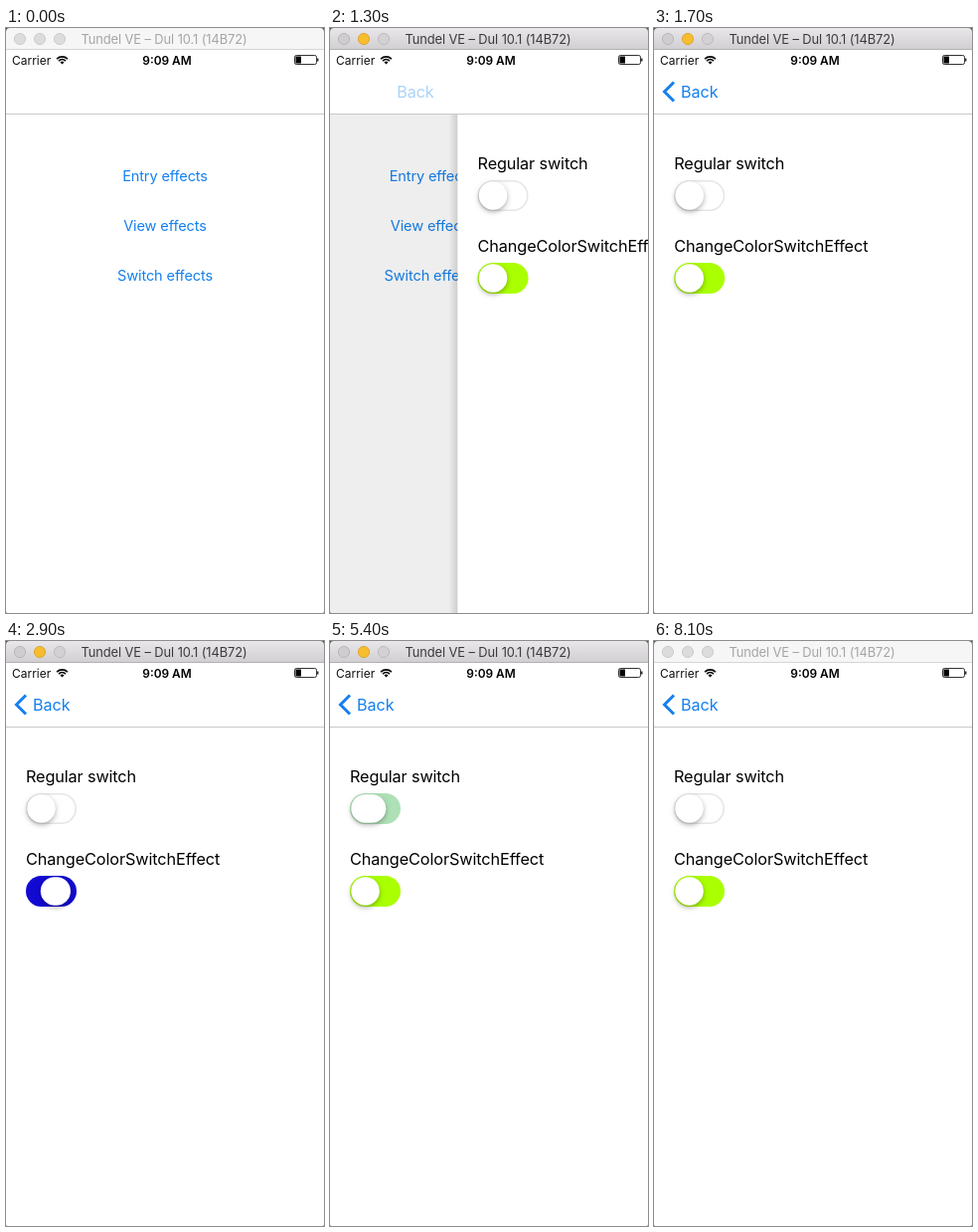
An HTML page with a canvas for the animation above (8.2 s loop, 320 by 588 pixels).

```html
<!DOCTYPE html>
<html lang="en">
<head>
<meta charset="utf-8">
<title>Switch effects</title>
<style>
html, body { margin: 0; width: 100%; height: 100%; overflow: hidden; background: #fff; }
canvas { display: block; width: 320px; height: 588px; }
</style>
</head>
<body>
<canvas id="stage"></canvas>
<script>
const W = 320, H = 588, LOOP = 8200, TICK = 100;
const BLUE = '#1480f0', GREY = [229, 229, 229], GREEN = [76, 217, 100];
const LIME = [170, 255, 0], INDIGO = [18, 9, 210];
const canvas = document.getElementById('stage');
const ctx = canvas.getContext('2d');
const dpr = window.devicePixelRatio || 1;
canvas.width = W * dpr;
canvas.height = H * dpr;

const clamp = v => Math.max(0, Math.min(1, v));
const ramp = (t, from, to) => clamp((t - from) / (to - from));
const ease = v => v * v * (3 - 2 * v);
const lerp = (a, b, k) => a + (b - a) * k;
const mix = (a, b, k) => `rgb(${a.map((v, i) => Math.round(lerp(v, b[i], k)))})`;

function text(str, x, y, size, color, opt = {}) {
  ctx.font = `${opt.weight || 400} ${size}px Inter, Roboto, sans-serif`;
  ctx.letterSpacing = (opt.spacing || 0) + 'px';
  ctx.textAlign = opt.align || 'left';
  ctx.fillStyle = color;
  ctx.fillText(str, x, y);
}

function pill(x, y, w, h, color) {
  ctx.fillStyle = color;
  ctx.beginPath();
  ctx.roundRect(x, y, w, h, Math.min(w, h) / 2);
  ctx.fill();
}

function withAlpha(alpha, draw) {
  ctx.save();
  ctx.globalAlpha = alpha;
  draw();
  ctx.restore();
}

function titleBar(active) {
  const g = ctx.createLinearGradient(0, 0, 0, 21);
  g.addColorStop(0, active ? '#e9e7e9' : '#f6f6f6');
  g.addColorStop(1, active ? '#d1cfd1' : '#f6f6f6');
  ctx.fillStyle = g;
  ctx.fillRect(0, 0, W, 22);
  ctx.fillStyle = active ? '#b3b1b3' : '#d6d6d6';
  ctx.fillRect(0, 21, W, 1);
  const fills = active ? ['#cfcdcf', '#f8bd2f', '#d3d1d3'] : ['#dcdcdc', '#dcdcdc', '#dcdcdc'];
  const rims = active ? ['#b5b3b5', '#dca32c', '#bab8ba'] : ['#c9c9c9', '#c9c9c9', '#c9c9c9'];
  fills.forEach((fill, i) => {
    ctx.beginPath();
    ctx.arc(14 + 20 * i, 11, 5.6, 0, 7);
    ctx.fillStyle = fill;
    ctx.fill();
    ctx.lineWidth = 0.9;
    ctx.strokeStyle = rims[i];
    ctx.stroke();
  });
  text('Tundel VE – Dul 10.1 (14B72)', 159, 16, 12.9, active ? '#3c3b3c' : '#a5a5a5',
    { align: 'center', spacing: -0.1 });
}

function statusBar() {
  text('Carrier', 6, 36.6, 12, '#111');
  text('9:09 AM', 162, 36.6, 11.9, '#000', { align: 'center', weight: 600 });
  ctx.strokeStyle = ctx.fillStyle = '#000';
  ctx.lineWidth = 1.7;
  for (const r of [7.6, 4.8]) {
    ctx.beginPath();
    ctx.arc(56.5, 36.5, r, -Math.PI * 0.75, -Math.PI * 0.25);
    ctx.stroke();
  }
  ctx.beginPath();
  ctx.moveTo(56.5, 36.5);
  ctx.arc(56.5, 36.5, 2.8, -Math.PI * 0.75, -Math.PI * 0.25);
  ctx.fill();
  ctx.lineWidth = 1;
  ctx.strokeStyle = '#333';
  ctx.beginPath();
  ctx.roundRect(290.5, 27.5, 22, 9, 1.8);
  ctx.stroke();
  ctx.fillRect(291.5, 28.5, 5.5, 7);
  ctx.fillRect(313.2, 30.5, 1.2, 3);
}

function navBar(p) {
  ctx.fillStyle = '#fff';
  ctx.fillRect(0, 22, W, 64);
  ctx.fillStyle = '#c9c9c9';
  ctx.fillRect(0, 86, W, 1);
  statusBar();
  if (p <= 0) return;
  withAlpha(clamp((p - 0.87) / 0.13), () => {
    ctx.strokeStyle = BLUE;
    ctx.lineWidth = 3;
    ctx.beginPath();
    ctx.moveTo(20, 54.5);
    ctx.lineTo(10.5, 64);
    ctx.lineTo(20, 73.5);
    ctx.stroke();
  });
  withAlpha(p * p, () => text('Back', lerp(127, 27, p), 70, 16.2, BLUE, { spacing: -0.1 }));
}

function homePage(x, pressed) {
  ['Entry effects', 'View effects', 'Switch effects'].forEach((label, i) => {
    withAlpha(pressed && i === 2 ? 0.2 : 1, () =>
      text(label, x + 160, 153.6 + 50 * i, 14.6, BLUE, { align: 'center', spacing: -0.15 }));
  });
}

// s: on = thumb travel, tint = colour blend, hole = size of the white inset, stretch = extra thumb width
function toggle(x, y, off, on, s) {
  pill(x, y, 51, 31, mix(off, on, s.tint));
  if (s.hole > 0) {
    const w = 48 * s.hole, h = 28 * s.hole;
    pill(x + 25.5 - w / 2, y + 15.5 - h / 2, w, h, '#fff');
  }
  const w = 28.5 + s.stretch;
  const left = x + 1.3 + (51 - 2.6 - w) * s.on;
  ctx.save();
  ctx.shadowColor = 'rgba(0,0,0,.32)';
  ctx.shadowBlur = 5 * dpr;
  ctx.shadowOffsetY = 2 * dpr;
  pill(left, y + 1.2, w, 28.5, '#fff');
  ctx.restore();
}

// Press, release and settle for a switch turned on and later off again
function toggleState(t, onAt, offAt, hollow) {
  const slide = at => ease(ramp(t, at, at + 300));
  const press = at => ease(ramp(t, at - 200, at - 50)) * (1 - slide(at));
  const tint = ramp(t, onAt - 50, onAt + 90) - ramp(t, offAt, offAt + 280);
  const shrink = ramp(t, onAt - 200, onAt);
  const grow = 1 - Math.pow(1 - ramp(t, offAt, offAt + 600), 3);
  return {
    on: slide(onAt) - slide(offAt),
    tint,
    hole: hollow ? (t < offAt ? 1 - shrink : grow) : 0,
    stretch: 6.5 * (press(onAt) + press(offAt))
  };
}

function switchPage(x, t) {
  ctx.fillStyle = '#fff';
  ctx.fillRect(x, 87, W, H - 87);
  text('Regular switch', x + 20, 142, 16.3, '#000', { spacing: -0.15 });
  text('ChangeColorSwitchEffect', x + 20, 225.4, 16.3, '#000', { spacing: -0.12 });
  toggle(x + 20, 153, GREY, GREEN, toggleState(t, 5400, 6000, true));
  toggle(x + 20, 236, LIME, INDIGO, toggleState(t, 2700, 3850, false));
}

// Critically damped spring, 0 to 1
function push(t) {
  const u = Math.max(0, t - 1195) * 0.0192;
  return t > 1850 ? 1 : 1 - (1 + u) * Math.exp(-u);
}

function corners() {
  ctx.fillStyle = '#555';
  for (const [x, y, r] of [[0, 0, 4], [W, 0, 4], [0, H, 1.5], [W, H, 1.5]]) {
    const dx = x ? -r : r, dy = y ? -r : r;
    ctx.beginPath();
    ctx.moveTo(x, y);
    ctx.lineTo(x + dx, y);
    ctx.quadraticCurveTo(x, y, x, y + dy);
    ctx.fill();
  }
}

function draw(t) {
  ctx.setTransform(dpr, 0, 0, dpr, 0, 0);
  ctx.fillStyle = '#fff';
  ctx.fillRect(0, 0, W, H);
  const p = push(t), x = W * (1 - p);
  if (p < 1) {
    homePage(-96 * p, t >= 1100 && t < 1300);
    ctx.fillStyle = `rgba(0,0,0,${0.11 * p})`;
    ctx.fillRect(0, 87, x, H - 87);
    if (p > 0) {
      const g = ctx.createLinearGradient(x - 9, 0, x, 0);
      g.addColorStop(0, 'rgba(0,0,0,0)');
      g.addColorStop(1, `rgba(0,0,0,${lerp(0.3, 0.04, p)})`);
      ctx.fillStyle = g;
      ctx.fillRect(x - 9, 87, 9, H - 87);
    }
  }
  if (p > 0) switchPage(x, t);
  navBar(p);
  titleBar(t >= 1000 && t < 7700);
  corners();
}

const start = performance.now();
function frame() {
  const t = (performance.now() - start) % LOOP;
  draw(Math.floor(t / TICK) * TICK);
  requestAnimationFrame(frame);
}
frame();
</script>
</body>
</html>
```
